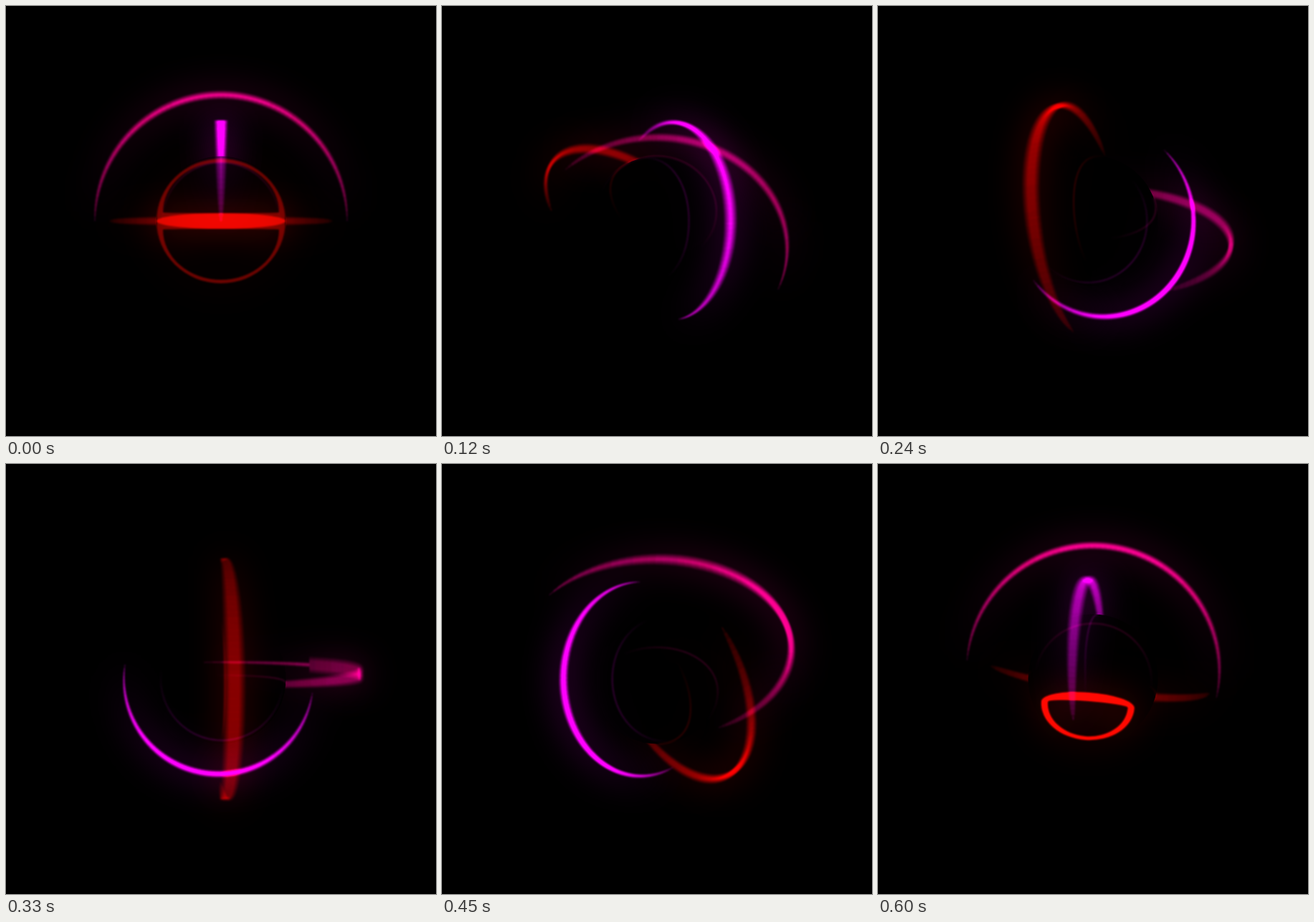
An HTML page with a canvas that plays this animation: 600x600 px, repeating every 0.63 s.

```html
<!DOCTYPE html>
<html lang="en">
<head>
<meta charset="utf-8">
<title>Light rings</title>
<style>
html, body { margin: 0; width: 100%; height: 100%; overflow: hidden; background: #000; }
canvas { display: block; width: 600px; height: 600px; }
</style>
</head>
<body>
<canvas id="stage" width="600" height="600"></canvas>
<script>
const SIZE = 600, MID = 300, LOOP = 630, STEP = 30;
const CAMERA = 400, BALL = 88.7, BALL_EDGE = 90.5, NEAR = 159;
const SEGMENTS = 80, STRANDS = 5;
const { PI, sin, cos, hypot, abs, max, min } = Math;

const stage = document.getElementById('stage').getContext('2d');
const makeLayer = () => {
  const c = document.createElement('canvas');
  c.width = c.height = SIZE;
  return c.getContext('2d');
};
const back = makeLayer(), front = makeLayer(), shine = makeLayer();

// Each pose: u and v span the ring's plane, n is its normal, mid is the arc's centre.
const rings = [
  {
    radius: 155, depth: 6.5, thick: 6.4, alpha: 0.085, color: '255,0,0',
    pose(a) {
      const s = sin(a), c = cos(a);
      return { u: [c, s * c, -s * s], v: [0, s, c], n: [s, -c * c, c * s], mid: 1.5 * PI - a };
    }
  },
  {
    radius: 176, depth: 6.5, thick: 7, alpha: 0.083, color: '255,0,140',
    pose(a) {
      const s = sin(a), c = cos(a);
      return { u: [1, 0, 0], v: [0, c, s], n: [0, -s, c], mid: a - PI / 2 };
    }
  },
  {
    radius: 132.5, depth: 5.5, thick: 6.8, alpha: 0.1, color: '255,0,255',
    pose(a) {
      const s = sin(a), c = cos(a);
      return { u: [s, 0, c], v: [0, 1, 0], n: [c, 0, -s], mid: 2 * a - PI / 2 };
    }
  }
];

const unit = p => {
  const d = hypot(...p) || 1;
  return p.map(x => x / d);
};

function project([x, y, z]) {
  const f = CAMERA / (CAMERA - z);
  return [MID + x * f, MID + y * f, f];
}

// Point on the ball where p is mirrored towards the camera.
function mirror(p) {
  let n = unit([p[0], p[1], p[2] + 150]);
  for (let i = 0; i < 8; i++) {
    const s = n.map(x => x * BALL);
    const toP = unit(p.map((x, j) => x - s[j]));
    const toEye = unit([-s[0], -s[1], CAMERA - s[2]]);
    n = unit(n.map((x, j) => 0.3 * x + toP[j] + toEye[j]));
  }
  return n.map(x => x * BALL);
}

function line(ctx, a, b, width, color, alpha) {
  ctx.strokeStyle = `rgba(${color},${alpha})`;
  ctx.lineWidth = width;
  ctx.beginPath();
  ctx.moveTo(a[0], a[1]);
  ctx.lineTo(b[0], b[1]);
  ctx.stroke();
}

// A ring is a sheaf of faint strands side by side, so it is brightest seen edge on.
function drawRing(ring, turn) {
  const { u, v, n, mid } = ring.pose(turn);
  const at = (angle, shift) => u.map((x, j) =>
    ring.radius * (x * cos(angle) + v[j] * sin(angle)) + n[j] * shift);

  for (let i = 0; i < SEGMENTS; i++) {
    const d0 = (i / SEGMENTS - 0.5) * PI, d1 = ((i + 1) / SEGMENTS - 0.5) * PI;
    const fade = cos((d0 + d1) / 2);
    const p = at(mid + d0, 0), q = at(mid + d1, 0);
    const z = (p[2] + q[2]) / 2;
    const near = z > NEAR ? 0.25 : 1;
    const gap = d => max(0, cos(d)) ** 0.4 * near * ring.depth / STRANDS;
    const width = ring.thick * fade ** 0.7 * near ** 0.6;
    const alpha = ring.alpha * (0.55 + 0.45 * fade);
    const ctx = z < 0 ? back : front;

    for (let k = -STRANDS; k <= STRANDS; k++) {
      const a = project(at(mid + d0, k * gap(d0)));
      const b = project(at(mid + d1, k * gap(d1)));
      line(ctx, a, b, width * a[2], ring.color, alpha);
    }

    const seen = project(p);
    const hidden = z < 0 && hypot(seen[0] - MID, seen[1] - MID) < BALL_EDGE + 8;
    if (!hidden) {
      line(shine, project(mirror(p)), project(mirror(q)), 2.2, ring.color, 0.17 * fade);
    }
  }
}

function dome(ctx, y, rx, top, low) {
  ctx.moveTo(rx, y);
  ctx.ellipse(0, y, rx, low, 0, 0, PI);
  ctx.ellipse(0, y, rx, top, 0, PI, 2 * PI);
}

// Red arc seen through the ball while it passes behind; dir 1 is below, -1 above.
function drawLens(s, dir) {
  const away = abs(s);
  const weight = s * dir <= 0 ? min(1, 0.4 + away / 45) : max(0, 0.4 - away / 60);
  const alpha = weight * max(0, min(1, 2 - away / 37));
  const rx = 90 - away * 0.83;
  if (alpha <= 0 || rx <= 10) return;
  const y = away * 1.2, drop = max(0, 12 - away * 0.4);
  const top = 11 + away * 0.2, low = max(10, 87 - y - away * 0.06);
  shine.save();
  shine.translate(MID, MID);
  shine.scale(dir, dir);
  shine.translate(-away * 0.15, 0);
  shine.rotate(away * 0.0025);
  shine.fillStyle = `rgba(255,8,0,${alpha})`;
  shine.beginPath();
  dome(shine, y, rx, top, low);
  dome(shine, y + drop, rx - 9, 1 + away * 0.14, low - 5 - drop);
  shine.fill('evenodd');
  shine.restore();
}

function blend(layer, blur, alpha) {
  stage.filter = `blur(${blur}px)`;
  stage.globalAlpha = alpha;
  stage.drawImage(layer.canvas, 0, 0);
  stage.filter = 'none';
  stage.globalAlpha = 1;
}

function draw(t) {
  for (const ctx of [back, front, shine]) {
    ctx.clearRect(0, 0, SIZE, SIZE);
    ctx.globalCompositeOperation = 'lighter';
  }
  for (const ring of rings) drawRing(ring, t / LOOP * PI);
  const s = t > LOOP / 2 ? t - LOOP : t;
  drawLens(s, 1);
  drawLens(s, -1);

  stage.globalCompositeOperation = 'source-over';
  stage.fillStyle = '#000';
  stage.fillRect(0, 0, SIZE, SIZE);
  stage.globalCompositeOperation = 'lighter';
  blend(back, 24, 0.6);
  blend(back, 0.8, 1);
  stage.globalCompositeOperation = 'source-over';
  stage.beginPath();
  stage.arc(MID, MID, BALL_EDGE, 0, 2 * PI);
  stage.fill();
  stage.globalCompositeOperation = 'lighter';
  blend(shine, 24, 0.5);
  blend(shine, 1.2, 1);
  blend(front, 24, 0.6);
  blend(front, 0.8, 1);
}

const start = performance.now();
let shown = -1;
function tick() {
  const t = Math.floor((performance.now() - start) % LOOP / STEP) * STEP;
  if (t !== shown) draw(shown = t);
  requestAnimationFrame(tick);
}
tick();
</script>
</body>
</html>
```
